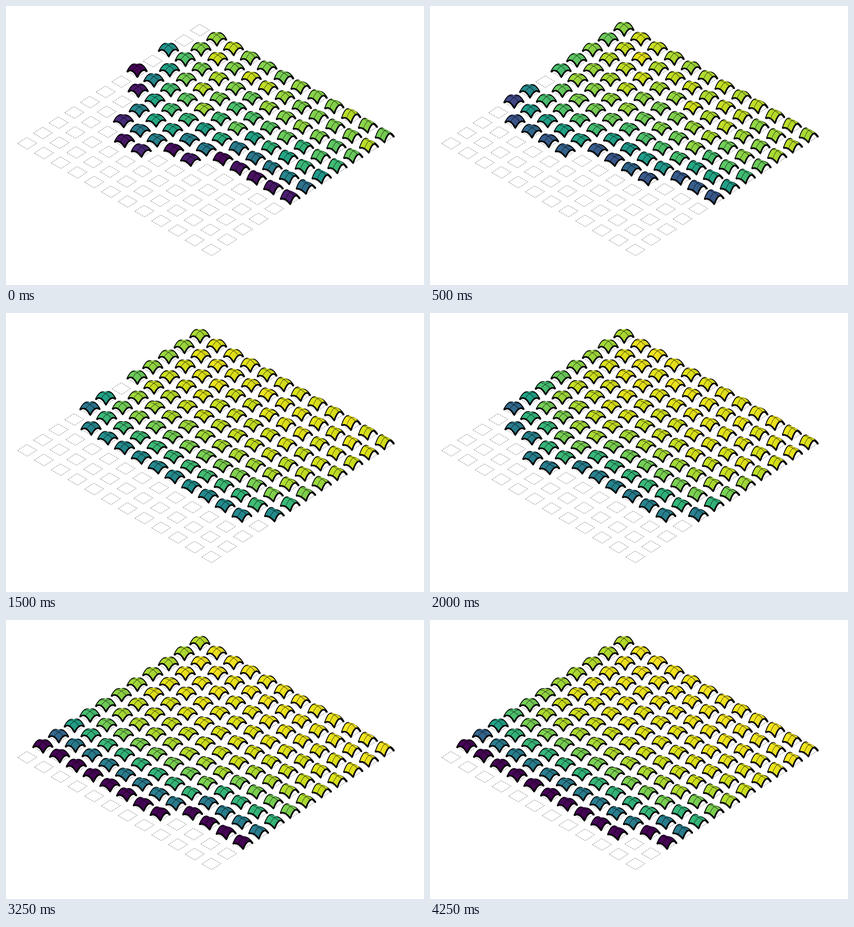
Write a matplotlib script that moves like this. It is 917 by 611 pixels and loops after 9250 ms.

```python
import numpy as np
import matplotlib
import matplotlib.pyplot as plt
from matplotlib.animation import FuncAnimation
from matplotlib.collections import LineCollection, PolyCollection

W, H, DPI = 917, 611, 100
PX = 72 / DPI
N = 12                               # cells per side
TOP = np.array([425.3, 53.0])
EA = np.array([-34.45, 22.52])       # step down-left
EB = np.array([36.75, 21.2])         # step down-right
HALF = 0.295                         # half a tile, in steps
STEP, TICKS = 250, 37
CUTS = [0, 2, 4, 6, 8, 10, 13, 17]   # ticks at which the archive is redrawn
CMAP = matplotlib.colormaps["viridis"]
BLACK, CLEAR = (0, 0, 0, 1), (0, 0, 0, 0)
M = 6                                # quads per shell side

# How far the filled area reaches along a, at four values of b over time.
REACH_B = [0, 3, 7, 11]
REACH = {0: [5, 9.3, 7.6, 7], 2: [8.7, 9.2, 8, 7.5], 6: [8.5, 9.4, 9.2, 8.75],
         10: [8.7, 10.8, 9.7, 8.75], 13: [11, 11, 10.8, 10], 17: [11, 11, 11, 10.7]}
LATE = {(0, 0): 2, (1, 0): 2, (3, 0): 2, (5, 0): 8}   # tick of first filling

still = np.random.default_rng(5)
STILL_SHAPE = still.uniform(-1, 1, (N, N, 3))
STILL_TINT = still.uniform(-1, 1, (N, N))


def reach(b, tick):
    ends = [np.interp(b, REACH_B, key) for key in REACH.values()]
    return int(np.interp(tick, list(REACH), ends) + 0.2)


def fitness(a, b, tick, noise):
    """Low at the frontier, rising to a plateau that improves with time."""
    young = np.exp(-tick / 4)
    plateau = 99 - 12 * young
    edge = 48 * max(0, 1 - ((tick - 6) / 6.5) ** 2)
    depth = reach(b, tick) - a - 1
    value = plateau - (plateau - edge) * np.exp(-depth / 1.8)
    if b == 0:
        value -= 9
    return np.clip(value + (1 + 8 * young) * noise, 0, 100) / 100


def center(a, b):
    return TOP + a * EA + b * EB


def shell(a, b, jitter):
    """Screen points of a vaulted patch standing on its tile."""
    t = np.linspace(-1, 1, M + 1)
    u, v = np.meshgrid(t, t, indexing="ij")
    down, right = a / (N - 1), b / (N - 1)
    flat = np.exp(-((a - 6) ** 2 + (b - 4) ** 2) / 18)
    arch_u = 7.8 + right * (5 - 3.5 * down) - 2 * flat + jitter[0]
    arch_v = 7.8 - 4 * right - 2 * flat + jitter[1]
    sag = 3 - right + 1.5 * jitter[2]
    pu, pv = 1 - u ** 2, 1 - v ** 2
    z = arch_u * pu + arch_v * pv - sag * pu * pv
    v = v + 0.13 * right * (1 - down) * (1 - v)
    pts = center(a, b) + HALF * (u[..., None] * EA + v[..., None] * EB)
    pts[..., 1] -= z
    return pts


def shell_parts(pts, color):
    """Paths of one shell from back to front, with fill, stroke and width."""
    yield np.vstack([pts[::-1, 0], pts[0, 1:]]), CLEAR, BLACK, 4.4 * PX
    mid = M // 2
    for i, j in sorted(np.ndindex(M, M), key=sum):
        light = min(1, 0.97 + 0.07 * (i - j) / M)
        fill = (*(light * np.array(color[:3])), 1)
        quad = [pts[i, j], pts[i + 1, j], pts[i + 1, j + 1], pts[i, j + 1]]
        yield np.array(quad), fill, fill, 0.7 * PX
        if i == mid:
            yield pts[i, j:j + 2], CLEAR, BLACK, 0.7 * PX
        if j == mid:
            yield pts[i:i + 2, j], CLEAR, BLACK, 0.7 * PX
    yield np.vstack([pts[-1], pts[-2::-1, -1]]), CLEAR, BLACK, 3.4 * PX


def build(tick):
    rng = np.random.default_rng(40 + tick)
    shape = 0.6 * STILL_SHAPE + 0.4 * rng.uniform(-1, 1, (N, N, 3))
    tint = 0.6 * STILL_TINT + 0.4 * rng.uniform(-1, 1, (N, N))
    parts = []
    for a, b in sorted(np.ndindex(N, N), key=sum):
        if a < reach(b, tick) and tick >= LATE.get((a, b), 0):
            color = CMAP(float(fitness(a, b, tick, tint[a, b])))
            parts += shell_parts(shell(a, b, shape[a, b]), color)
    paths, faces, edges, widths = zip(*parts)
    return PolyCollection(paths, closed=False, facecolors=faces, edgecolors=edges,
                          linewidths=widths, capstyle="round", joinstyle="round",
                          zorder=2, visible=False)


fig = plt.figure(figsize=(W / DPI, H / DPI), dpi=DPI, facecolor="white")
ax = fig.add_axes([0, 0, 1, 1])
ax.set(xlim=(0, W), ylim=(H, 0))
ax.axis("off")

corners = [(1, -1), (-1, -1), (-1, 1), (1, 1), (1, -1)]
tiles = [[center(a, b) + HALF * (u * EA + v * EB) for u, v in corners]
         for a, b in np.ndindex(N, N)]
ax.add_collection(LineCollection(tiles, colors="#6a6a6a", linewidths=0.9 * PX,
                                 linestyles=[(0, (2.6, 2.2))], zorder=1))
ax.plot([15, 903], [610.5, 610.5], color="#f3f3f3", lw=PX, zorder=0)

layers = [ax.add_collection(build(tick)) for tick in CUTS]


def update(tick):
    current = np.searchsorted(CUTS, tick, side="right") - 1
    for k, layer in enumerate(layers):
        layer.set_visible(k == current)
    return layers


anim = FuncAnimation(fig, update, frames=TICKS, interval=STEP, repeat=True,
                     repeat_delay=0, init_func=lambda: update(0), blit=False)
plt.show()
```
